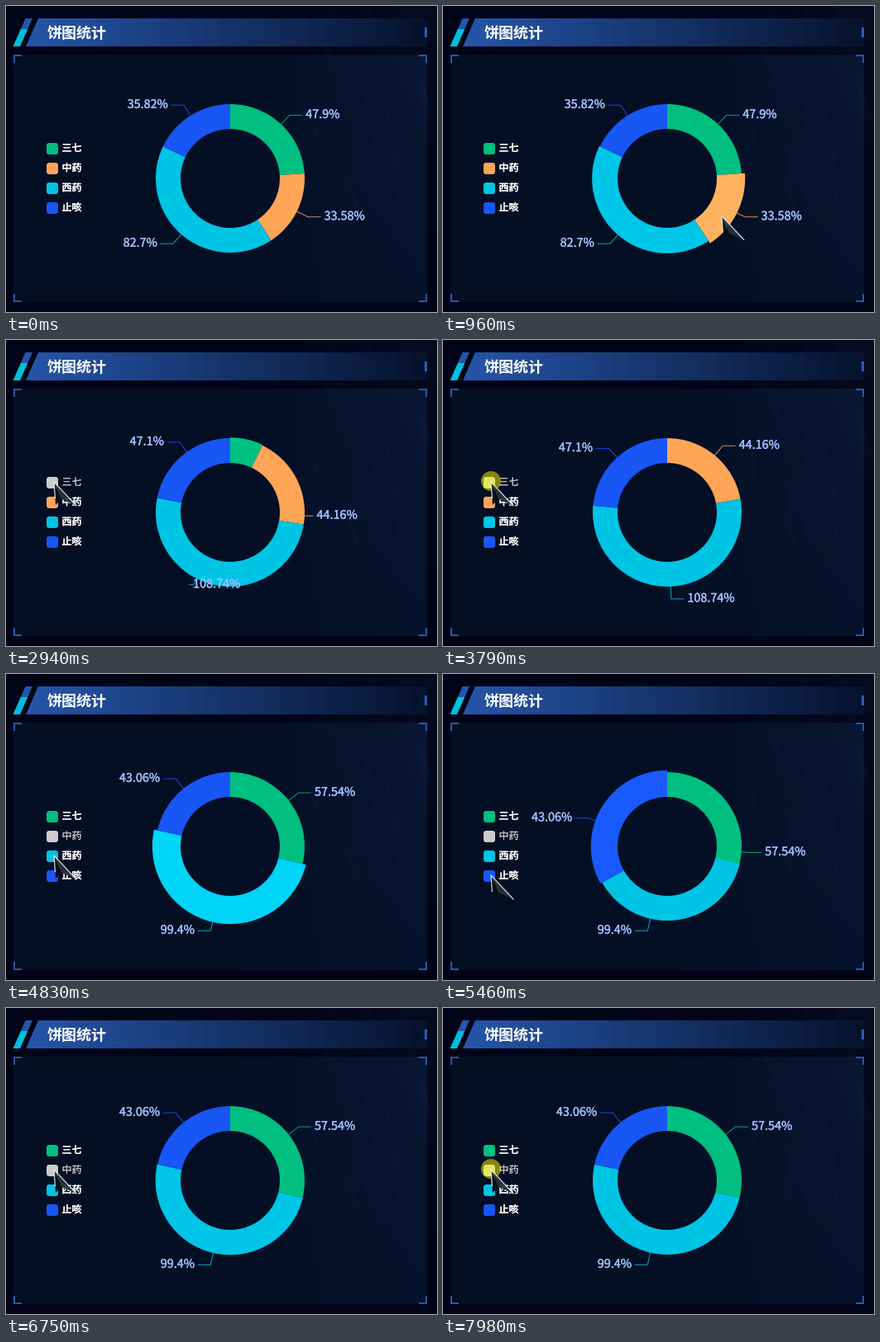
A matplotlib script for the animation above (8 s loop, 521x371 px).

```python
import numpy as np
import matplotlib.pyplot as plt
from matplotlib.animation import FuncAnimation
from matplotlib.colors import to_rgb
from matplotlib.patches import Circle, FancyBboxPatch, Polygon, Rectangle, Wedge
from matplotlib.patheffects import withStroke

W, H, DPI = 521, 371, 128
LOOP, STEP = 8000, 50
PT = 72 / DPI
FONT = "Noto Sans CJK JP"

CENTER, R_OUT, R_IN = np.array([271, 209]), 90, 60
NAMES = ["三七", "中药", "西药", "止咳"]
COLORS = ["#00bf80", "#ffa557", "#00c4e4", "#1856f5"]
VALUES = np.array([23.9439, 16.792, 41.3519, 17.9122])
OFF, LABEL = "#cccccc", "#9fbfff"

MORPH, APPEAR = 300, 230
# (time, slice) of each legend click
TOGGLES = [(2800, 0), (3830, 0), (4430, 1), (4980, 2), (5395, 2),
           (5740, 3), (6180, 3), (6890, 1), (7470, 1)]
CLICKS = [t for t, _ in TOGGLES] + [LOOP]
# the cursor first circles the ring, then glides: depart, arrive, legend row
SWEEP_END = 1750
GLIDES = [(1750, 2780, 0), (4000, 4300, 1), (4550, 4750, 2),
          (5400, 5440, 3), (6500, 6700, 1)]


def ease_out(u):
    return 1 - (1 - u) ** 3


def smooth(u):
    return u * u * (3 - 2 * u)


def lerp(a, b, u):
    return a + (b - a) * u


def progress(t, start, end):
    return min(max((t - start) / (end - start), 0.0), 1.0)


def polar(degrees, radius):
    """Point at an angle clockwise from the top of the ring."""
    a = np.radians(degrees)
    return CENTER + radius * np.array([np.sin(a), -np.cos(a)])


# ---------- pie state ----------

def spans(on):
    """Start and end angle of each slice."""
    ends = np.cumsum(VALUES * on) / (VALUES * on).sum() * 360
    return np.column_stack([np.r_[0, ends[:-1]], ends])


def percents(on):
    """Hundredths of a percent by largest remainder, shown doubled."""
    exact = VALUES * on / (VALUES * on).sum() * 10000
    seats = np.floor(exact)
    spare = int(round(10000 - seats.sum()))
    seats[np.argsort(seats - exact)[:spare]] += 1
    return [f"{s / 50:.2f}".rstrip("0").rstrip(".") + "%" for s in seats]


def leader(span):
    """Three points of a label's line, and the side it points to."""
    mid = span.mean()
    side = 1 if mid <= 180 else -1
    elbow = polar(mid, R_OUT + 15)
    return np.array([polar(mid, R_OUT), elbow, elbow + (15 * side, 0)]), side


def pie_state(t):
    before, now, since, last = np.ones(4, bool), np.ones(4, bool), -MORPH, None
    for when, i in TOGGLES:
        if t >= when:
            before = now.copy()
            now[i] = not now[i]
            since, last = when, i
    return before, now, progress(t, since, since + MORPH), last


# ---------- cursor and hover ----------

def row_y(i):
    return 172 + 24 * i


def cursor(t):
    u = progress(t, APPEAR, SWEEP_END)
    pos = polar(185 - 269 * u ** 2, 80 + 12.6 * (2 * u - 1) ** 4)
    for depart, arrive, row in GLIDES:
        pos = lerp(pos, np.array([58, row_y(row)]), smooth(progress(t, depart, arrive)))
    return pos


def hovered(t):
    """Slice under the cursor; a slice just clicked does not react."""
    _, now, _, last = pie_state(t)
    x, y = cursor(t)
    dx, dy = x - CENTER[0], y - CENTER[1]
    hit = None
    if R_IN < np.hypot(dx, dy) < R_OUT:
        angle = np.degrees(np.arctan2(dx, -dy)) % 360
        hit = int(np.searchsorted(spans(now)[:, 1], angle))
    elif 49 <= x <= 93:
        hit = next((i for i in range(4) if abs(y - row_y(i)) < 9), None)
    return hit if hit is not None and now[hit] and hit != last and t >= APPEAR else None


def hover_levels():
    levels = np.zeros((LOOP // STEP, 4))
    for n in range(1, len(levels)):
        goal = np.arange(4) == hovered(n * STEP)
        levels[n] = lerp(levels[n - 1], goal, 0.45)
    return levels


LEVELS = hover_levels()

# ---------- fixed scene ----------

def backdrop():
    y, x = np.mgrid[0:H, 0:W].astype(float)
    img = np.empty((H, W, 3))
    img[:] = (2, 5, 23)
    inside = (x >= 9) & (x < 509) & (y >= 59) & (y < 359)
    img[inside] = (5, 15, 36)
    right = np.clip((x - 250) / 260, 0, 1)
    img += (right * inside)[..., None] * np.array([1, 4, 8])

    # light and faint streaks at the upper right
    haze = np.clip((x - 330) / 190, 0, 1) * np.clip(1 - y / 330, 0, 1)
    rng = np.random.default_rng(4)
    for _ in range(18):
        px, py = rng.uniform(360, 521), rng.uniform(0, 240)
        lean, sx, sy = rng.uniform(-0.1, 0.4), rng.uniform(1.5, 5), rng.uniform(10, 35)
        off = x - px - lean * (y - py)
        haze += 0.5 * np.exp(-(off / sx) ** 2 - ((y - py) / sy) ** 2)
    img += haze[..., None] * np.array([4, 6, 9])
    return np.clip(img, 0, 255).astype(np.uint8)


fig = plt.figure(figsize=(W / DPI, H / DPI), dpi=DPI, facecolor="#020517")
ax = fig.add_axes([0, 0, 1, 1])
ax.imshow(backdrop(), extent=(0, W, H, 0), interpolation="nearest", aspect="auto")


def shape(points, color, **kw):
    return ax.add_patch(Polygon(points, closed=True, fc=color, lw=0, **kw))


def words(x, y, s, px, color="white", heavy=0.0, **kw):
    text = ax.text(x, y, s, fontsize=px * PT, color=color, family=FONT,
                   va="baseline", **kw)
    if heavy:
        text.set_path_effects([withStroke(linewidth=heavy * PT, foreground=color)])
    return text


def header():
    x = np.arange(24, 509)
    banded = np.where(x < 186, x, 186 + 18 * ((x - 186) // 18) + 9)
    u = ((banded - 24) / 485)[None, :, None]
    bar = lerp(np.array([38, 86, 170]), np.array([6, 18, 44]), u) / 255
    image = ax.imshow(np.clip(bar, 0, 1), extent=(24, 509, 49, 15),
                      interpolation="nearest", aspect="auto")
    image.set_clip_path(shape([(39, 15), (509, 15), (509, 49), (24, 49)], "none"))
    shape([(23.5, 15), (32, 15), (26.3, 28), (17.8, 28)], "#2355ac")
    shape([(17.8, 28), (26.3, 28), (17, 49), (8.5, 49)], "#00bfdc")
    ax.add_patch(Rectangle((506, 26), 3, 12, fc="#2e5cb4", lw=0))
    words(49.5, 39, "饼图统计", 18, weight="bold")


def brackets():
    for x, dx in ((9, 1), (509, -1)):
        for y, dy in ((59, 1), (359, -1)):
            for w, h in ((10, 2), (2, 10)):
                ax.add_patch(Rectangle((x, y), w * dx, h * dy, fc="#2757ac", lw=0))


header()
brackets()
ax.set_xlim(0, W)
ax.set_ylim(H, 0)
ax.axis("off")

# ---------- moving parts ----------

wedges, lines, labels, swatches, captions = [], [], [], [], []
for i, (name, color) in enumerate(zip(NAMES, COLORS)):
    wedges.append(ax.add_patch(Wedge(CENTER, R_OUT, 0, 90, width=R_OUT - R_IN,
                                     fc=color, lw=0, zorder=2 + i * 0.01)))
    lines.append(ax.plot([], [], color=color, lw=PT, alpha=0.85, zorder=3)[0])
    labels.append(words(0, 0, "", 14.4, LABEL, heavy=0.35, zorder=3))
    swatches.append(ax.add_patch(FancyBboxPatch(
        (49, row_y(i) - 6), 14, 14, boxstyle="round,pad=0,rounding_size=3",
        fc=color, lw=0, zorder=3)))
    captions.append(words(67.5, row_y(i) + 4.2, name, 12, zorder=3))

ring = ax.add_patch(Circle((0, 0), 12, fc="#ffff00", alpha=0.5, lw=0, zorder=5))
TIP, LEFT, NOTCH, RIGHT = np.array([(0, 0), (2, 28), (9, 21), (27, 29)])
HALVES = [np.array([TIP, LEFT, NOTCH]), np.array([TIP, NOTCH, RIGHT])]
halves = [shape(HALVES[0], "#060d16", alpha=0.95, zorder=6),
          shape(HALVES[1], "#2a3138", alpha=0.95, zorder=6)]
EDGE = np.array([LEFT * 0.7, TIP, RIGHT])
edge = ax.plot([], [], color="#eef4f8", lw=1.2 * PT, alpha=0.9, zorder=7)[0]


def draw_slice(i, level, span):
    radius = R_OUT + 5 * level
    wedge = wedges[i]
    wedge.set_visible(span[1] - span[0] > 0.1)
    wedge.set_theta1(span[0] - 90)
    wedge.set_theta2(span[1] - 90)
    wedge.set_radius(radius)
    wedge.set_width(radius - R_IN)
    wedge.set_facecolor(np.minimum(np.array(to_rgb(COLORS[i])) * (1 + 0.1 * level), 1))


def draw_label(i, goal, side, origin, u, text):
    points = lerp(origin, goal, u)
    lines[i].set_data(*points.T)
    labels[i].set_text(text)
    labels[i].set_ha("left" if side > 0 else "right")
    labels[i].set_position(points[2] + (4.5 * side, 3.6))


def draw_legend(i, on):
    tone = "white" if on else OFF
    swatches[i].set_facecolor(COLORS[i] if on else OFF)
    captions[i].set_color(tone)
    captions[i].set_path_effects([withStroke(linewidth=0.5 * PT * on, foreground=tone)])


def draw_cursor(t):
    tip = cursor(t)
    for points, patch in zip(HALVES, halves):
        patch.set_xy(points + tip)
    edge.set_data(*(EDGE + tip).T)
    for part in halves + [edge]:
        part.set_visible(t >= APPEAR)
    ring.set_visible(any(c - 90 <= t < c + 30 for c in CLICKS))
    ring.center = tuple(tip - (0, 1))


def update(frame):
    t = frame * STEP
    before, now, u, _ = pie_state(t)
    old, new, texts = spans(before), spans(now), percents(now)
    for i in range(4):
        source = old[i].copy()
        if now[i] and not before[i]:
            source[0] = new[i, 0]  # a returning slice opens over its neighbour
        draw_slice(i, LEVELS[frame, i], lerp(source, new[i], ease_out(u)))
        draw_legend(i, now[i])
        lines[i].set_visible(now[i])
        labels[i].set_visible(now[i])
        if now[i]:
            goal, side = leader(new[i])
            origin = leader(old[i])[0] if before[i] else goal
            draw_label(i, goal, side, origin, u, texts[i])
    draw_cursor(t)
    return []


anim = FuncAnimation(fig, update, frames=LOOP // STEP, interval=STEP,
                     repeat=True, repeat_delay=0, blit=False)
plt.show()
```
